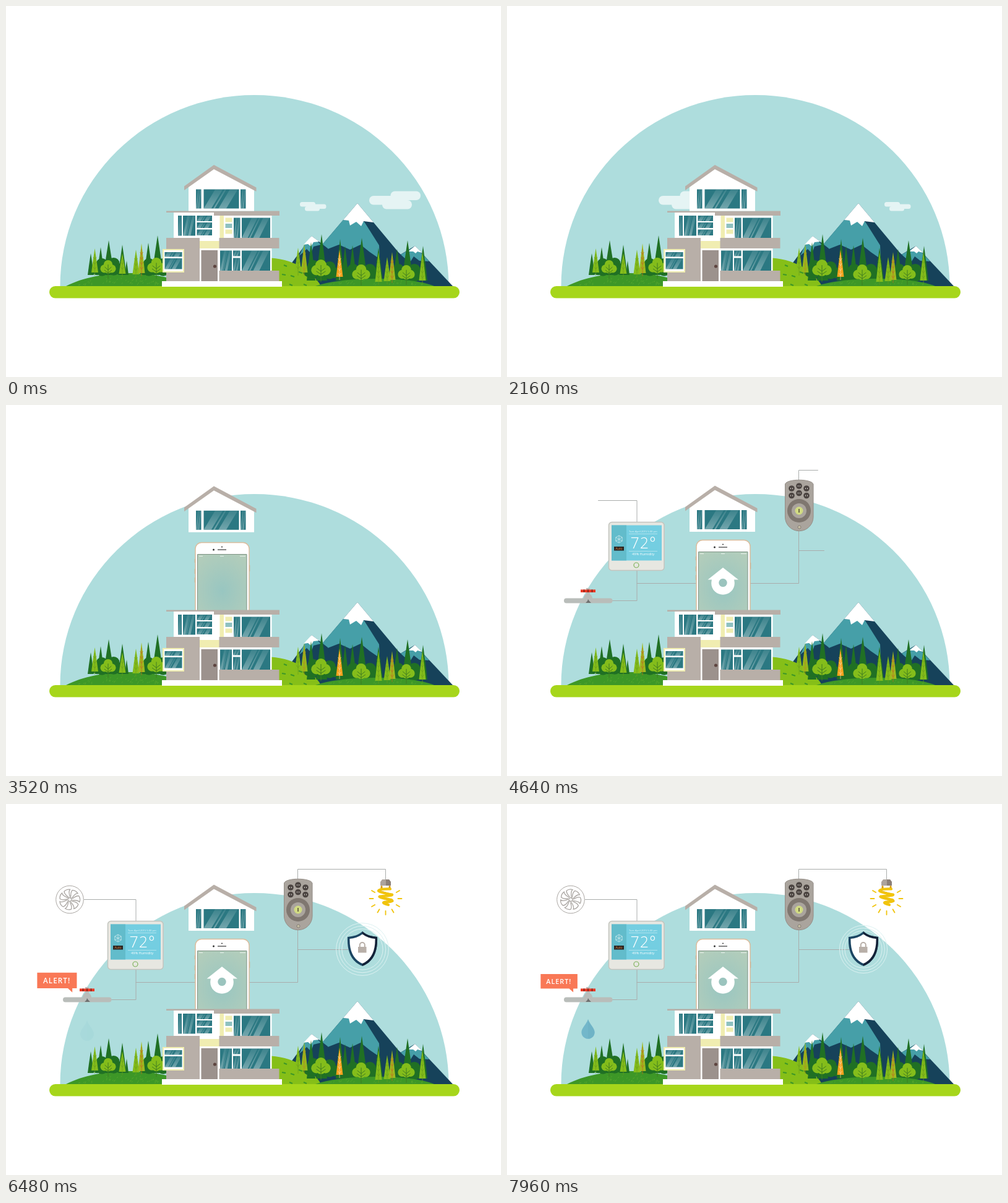
These frames come from a looping animation (800x600 px, 8000 ms). An HTML page:

```html
<!DOCTYPE html>
<html lang="en">
<head>
<meta charset="utf-8">
<title>Smart home</title>
<style>
html, body { margin: 0; width: 100%; height: 100%; overflow: hidden; background: #fff; }
svg { display: block; width: 100vw; height: 100vh; }
text { font-family: "Open Sans", "Noto Sans", sans-serif; fill: #fff; }
.wire { fill: none; stroke: #a9acab; stroke-width: 1; }
.gray { fill: #b8afa8; }
.cream { fill: #f0edb1; }
.white { fill: #fff; }
.navy { fill: #16425a; }
.teal { fill: #469fa8; }
</style>
</head>
<body>
<svg viewBox="0 0 800 600">
  <defs>
    <linearGradient id="shine" x1="0" y1="1" x2="0" y2="0">
      <stop offset="0" stop-color="#fff" stop-opacity=".34"/>
      <stop offset="1" stop-color="#fff" stop-opacity=".08"/>
    </linearGradient>
    <radialGradient id="screen" cx=".5" cy=".62" r=".75">
      <stop offset="0" stop-color="#98c6c1"/><stop offset="1" stop-color="#b4cdba"/>
    </radialGradient>
  </defs>

  <path d="M87.5 453A314 309 0 0 1 715.5 453Z" fill="#aedddd"/>

  <g class="white" opacity=".68">
    <g id="bigCloud">
      <rect x="587" y="307" width="58" height="14.5" rx="7"/>
      <rect x="621.5" y="299.5" width="48.5" height="14.5" rx="7"/>
      <rect x="608" y="314" width="48" height="14.5" rx="7"/>
    </g>
    <g id="smallCloud">
      <rect x="475" y="317" width="25" height="7.5" rx="3.5"/>
      <rect x="487" y="320.5" width="30.5" height="7.5" rx="3.5"/>
      <rect x="483" y="324" width="24" height="7.5" rx="3.5"/>
    </g>
  </g>

  <g id="mountains">
    <path class="navy" d="M661 388L722 453H600L634 404Z"/>
    <path class="teal" d="M661 389L636 403L645 408L652 416L659 405L668 412L684 413Z"/>
    <path class="white" d="M661 388L650 397L658 397L662 400L665 397L672 399Z"/>
    <path class="navy" d="M568 319L594 350L634 398L690 453H454Z"/>
    <path class="teal" d="M545 346L579 349L603 387L604 409L588 398L573 386L556 394L538 386L520 393L505 393Z"/>
    <path class="white" d="M568 319L545 346L554 347L556 355L566 349L574 356L578 348L594 350Z"/>
    <path class="navy" d="M494 372L520 392L540 453H440L460 418Z"/>
    <path class="teal" d="M483 384L503 380L509 386L497 389L493 400L486 393L474 404Z"/>
    <path class="white" d="M494 372L481 386L488 385L493 389L497 382L506 381Z"/>
  </g>

  <path d="M420 407C464 408 495 428 509 453H420Z" fill="#86bf18"/>
  <path d="M97 453C140 430 215 426 262 440V453Z" fill="#3d9727"/>
  <g id="trees"></g>
  <path d="M500 453C545 437 655 437 692 453Z" fill="#3d9727"/>
  <g id="grass" fill="none" stroke-width="1"></g>
  <g id="frontTrees"></g>
  <rect x="70" y="453" width="663" height="19.5" rx="9.75" fill="#a6d61b"/>

  <g class="wire">
    <path id="leftWire" d="M306 288.5H210V154.5H126"/>
    <path id="pipeWire" d="M210 288V316.5H170"/>
    <path id="rightWire" d="M393 288.5H471.5V105.5H613.5V122"/>
    <path id="shieldWire" d="M471.5 235.5H553"/>
  </g>

  <g id="phone">
    <path d="M305.5 245v6m0 10v8m0 6v8m88-28v10" stroke="#c5a888" stroke-width="1.5"/>
    <path d="M306 332.5V228.500A10 10 0 0 1 316 218.500H383A10 10 0 0 1 393 228.500V332.500" fill="#fff" stroke="#dcbd9d" stroke-width="1.5"/>
    <path d="M309.5 332.5V237.500H389V332.500" fill="url(#screen)" stroke="#7f9385"/>
    <circle cx="335.5" cy="230" r="1.5" fill="#333"/><circle cx="349" cy="225.5" r="1" fill="#333"/>
    <path d="M342 230H356" stroke="#444" stroke-width="1.3"/>
    <path d="M312 240.5h6m28 0h6m26 0h9" stroke="#fff" opacity=".7"/>
    <g id="homeIcon" class="white">
      <path d="M349 263L374 282.5H324.5Z"/><circle cx="349" cy="288" r="18.8"/>
      <circle cx="349" cy="287.5" r="6.7" fill="#9bc4be"/>
    </g>
  </g>

  <g id="house">
    <rect class="white" x="271" y="334" width="158.5" height="111"/>
    <rect class="gray" x="259" y="331.5" width="78" height="2.5"/>
    <rect class="gray" x="336" y="331.5" width="106" height="7.5"/>
    <rect class="cream" x="345.5" y="339" width="6.5" height="36"/>
    <path class="cream" d="M354.5 342.5h11v7h-11zm0 19h11v7h-11z"/>
    <rect x="354.5" y="352" width="11" height="7" fill="#8fc1c1"/>
    <rect class="cream" x="313" y="380" width="32" height="12"/>
    <rect class="gray" x="259" y="375" width="54" height="70"/>
    <rect class="gray" x="344.5" y="375" width="97" height="17"/>
    <rect class="gray" x="344.5" y="428" width="97" height="17"/>
    <rect x="315.5" y="395" width="26.5" height="50" fill="#9c928d"/>
    <circle cx="337.5" cy="421" r="2.6" fill="#5e4540"/>
    <rect class="cream" x="253" y="393" width="35" height="38"/>
    <rect class="white" x="255" y="395" width="31" height="34"/>
    <rect class="white" x="252" y="445" width="194" height="9"/>
  </g>
  <g id="roof">
    <path class="white" d="M295 292L336 262L401 297V331.5H295Z"/>
    <path class="gray" d="M288 291.5L336 257L404.5 293.5V300L336 264L288 298Z"/>
  </g>

  <g id="thermostat">
    <rect x="164.5" y="189.5" width="89.5" height="78" rx="5" fill="#e7e7e1" stroke="#c3c4be" stroke-width="1.5"/>
    <rect x="169" y="194.5" width="81" height="57" fill="#74cee1"/>
    <rect x="169" y="194.5" width="24" height="57" fill="#62bccb"/>
    <path d="M197 208.5H243M197 236.5H243" stroke="#fff" stroke-width=".6" opacity=".7"/>
    <path d="M181 211l5.2 3v6l-5.2 3l-5.2-3v-6zM181 211v12m-5.2-9l10.4 6m0-6l-10.4 6" fill="none" stroke="#d8f0f3" stroke-width=".7"/>
    <text x="197" y="206" font-size="4.1" opacity=".85">Tues April 2015 5:00 pm</text>
    <text x="199.5" y="232" font-size="25" font-weight="300" letter-spacing="1">72°</text>
    <text x="202" y="243" font-size="5.6">49% Humidity</text>
    <rect x="173" y="229" width="16" height="6.5" fill="#2b2522"/>
    <text x="175.5" y="234.2" font-size="5" style="fill:#f38a3c">Auto</text>
    <circle cx="209" cy="259" r="4" fill="none" stroke="#7fb35b" stroke-width="1.2"/>
  </g>

  <g id="remote">
    <path d="M449.5 128C452 119 492 119 495 128V181A22.7 22.7 0 0 1 449.5 181Z" fill="#aaa49d" stroke="#938c85"/>
    <circle cx="472" cy="171" r="19" fill="#7f7770"/><circle cx="472" cy="171" r="12" fill="#aaa49d"/>
    <circle cx="472" cy="171" r="6.5" fill="#d1db83"/>
    <path d="M472 168v6" stroke="#504a35" stroke-width="1.5"/>
    <circle cx="472.5" cy="197.5" r="2.3" fill="#f1eec9" stroke="#756e67"/><circle cx="472.5" cy="197.5" r=".8" fill="#655"/>
  </g>

  <g id="drop">
    <path d="M0-33C3-24 11-18 11-11A11 11 0 0 1-11-11C-11-18-3-24 0-33" fill="#479bbd"/>
    <path d="M0-33C3-24 11-18 11-11A11 11 0 0 1 0 0Z" fill="#3889ad" opacity=".4"/>
  </g>
  <g id="pipe">
    <path d="M128 296h6v10q4 2 4 7h-14q0-5 4-7z" fill="#b9bcb9"/>
    <rect x="92" y="312.5" width="78.5" height="8" rx="4" fill="#b9bdba"/>
    <rect x="119" y="298.5" width="24" height="4.5" fill="#ea3b27"/>
    <path d="M124.5 298.5v4.5m6.5-4.5v4.5m6.5-4.5v4.5" stroke="#6d2721" stroke-width="1.5"/>
    <path d="M131 314l2 3l3 3h-9l3-3z" fill="#6d706f"/>
  </g>

  <g id="fan" fill="#fff" stroke="#aaa6a2">
    <circle cx="103" cy="154.5" r="22.3"/>
    <g id="blades" fill="none" stroke-width="1.3"></g>
  </g>

  <g id="rings" fill="none" stroke="#dcf1f1"></g>
  <g id="shield">
    <path d="M576 206C582 212 591 214 600 215C601 239 594 255 576 262C558 255 551 239 552 215C561 214 570 212 576 206Z" fill="#1b4562"/>
    <path d="M576 206C582 212 591 214 600 215C601 239 594 255 576 262Z" fill="#142238"/>
    <path class="white" d="M576 210.5C582 215 589 217.5 596.5 218C597 238 590 252 576 258C562 252 555 238 555.5 218C563 217.5 570 215 576 210.5Z"/>
    <rect class="gray" x="569" y="231" width="13.5" height="9.5"/>
    <path d="M571.8 231v-3a4 4 0 0 1 8 0v3" fill="none" stroke="#b8afa8" stroke-width="2"/>
  </g>

  <g id="bulb" fill="none" stroke="#f1c40c" stroke-linecap="round">
    <path d="M605 132v-6l3-4h11l3 4v6z" fill="#aca39c" stroke="none"/>
    <path d="M614 122h5l3 4v6h-8z" fill="#8b8078" stroke="none"/>
    <path d="M607 133.500v4M620 133.500v4M603 141L624 147M603 150L625 157" stroke="#d99a12" stroke-width="3"/>
    <path d="M621 137.5Q602 137 602 140.500Q603 143 624 146.500Q626 148 604 149.500Q602 151 623 155Q628 158 612 158.500Q606 160 618 163" stroke-width="4.2"/>
    <g id="rays" stroke-width="1.8"></g>
  </g>

  <g id="alert">
    <path d="M60 278H113V299H107V304.5L101 299H60Z" fill="#f97856"/>
    <text x="68" y="292" font-size="9.6" font-weight="600" letter-spacing=".9">ALERT!</text>
  </g>
</svg>

<script>
const $ = id => document.getElementById(id);
const add = (id, markup) => $(id).insertAdjacentHTML('beforeend', markup);
const DARK = '#207024', LIGHT = '#84bd1b', ORANGE = '#f5a21d';

const spike = (x, top, base, w, color) => {
  const mid = (top + base) / 2, h = w / 2;
  return `<path d="M${x} ${top}Q${x + h * .55} ${mid} ${x + h} ${base}H${x - h}Q${x - h * .55} ${mid} ${x} ${top}" fill="${color}"/>`;
};
const leafTree = (x, top, base, color = LIGHT, vein = '#6a9c1c') => {
  let veins = `M${x} ${top + 9}V${base + 5}`;
  for (let y = top + 14; y < base - 3; y += 8) veins += `M${x - 2.5} ${y}l2.5 4l2.5-4`;
  return spike(x, top, base, 11, color) + `<path d="${veins}" fill="none" stroke="${vein}" stroke-width=".7"/>`;
};
const bush = (x, y, r, color) =>
  [[0, -.4, .6], [-.5, .15, .55], [.5, .15, .55], [0, .2, .6]].map(([dx, dy, k]) =>
    `<circle cx="${x + dx * r}" cy="${y + dy * r}" r="${k * r}" fill="${color}"/>`).join('');
const roundTree = (x, y, r) => bush(x, y, r, LIGHT) +
  `<path d="M${x} ${y - r * .4}V${y + r + 6}M${x - r * .45} ${y - 1}l${r * .45} 5l${r * .45}-5M${x - r * .5} ${y + 4}l${r * .5} 5l${r * .5}-5" fill="none" stroke="#3f7c20"/>`;

const pines = [
  [137, 400, 10], [153, 390, 12], [166, 379, 17], [188, 386, 13], [195, 412, 6], [230, 383, 14], [245, 371, 18],
  [493, 382, 14], [510, 369, 18], [540, 377, 14], [548, 388, 12], [560, 387, 13], [575, 375, 18],
  [602, 391, 14], [632, 393, 13], [649, 379, 18], [674, 388, 14]];
add('trees', pines.map(([x, top, w]) => spike(x, top, x < 300 ? 435 : 444, w, DARK)).join('') +
  [[155, 424], [174, 423], [231, 424], [254, 424], [497, 427], [523, 429], [561, 433], [588, 433], [634, 433], [660, 433]]
    .map(([x, y]) => bush(x, y, 16, DARK)).join('') +
  leafTree(143.5, 392, 431) + leafTree(188, 400, 433) + leafTree(210, 394, 434) +
  leafTree(219, 384, 432, '#9fb91e', '#bf6a22') + leafTree(472, 391, 431) + leafTree(482, 385, 431, '#94b91c', '#b78f20'));
add('frontTrees', roundTree(165, 423, 12) + roundTree(243, 421, 14) + roundTree(509, 425, 15) +
  roundTree(574, 432, 14) + roundTree(647, 432, 13) + leafTree(539, 394, 438, ORANGE, '#fbd9a0') +
  leafTree(602, 398, 446) + leafTree(616, 406, 445) + leafTree(624, 398, 443, '#9fb91e', '#bf6a22') + leafTree(673, 398, 444));

let seed = 7;
const random = () => (seed = seed * 16807 % 2147483647) / 2147483647;
let tufts = '';
for (let i = 0; i < 90; i++) {
  const left = i < 55, u = random() * 2 - 1;
  const x = left ? 185 + u * 68 : 597 + u * 76;
  const y = 452 - random() * (1 - u * u) * (left ? 15 : 9);
  tufts += `M${x.toFixed(1)} ${y.toFixed(1)}l1.5-2`;
}
add('grass', `<path d="${tufts}" stroke="#64ae31" opacity=".6"/>
  <path d="M449 419l5 2m-8 13l6 1m8 1l6 2m7-8l6 2m-21 18l5 2m18-2l5 2" stroke="#3d9727" stroke-width="2"/>`);

// Glass with slanted reflections that fade upward
const pane = ([x, y, w, h]) => {
  const slant = Math.min(w * .35, h * .6), room = w - slant;
  const band = (from, to) => `M${x + room * from} ${y + h}L${x + slant + room * from} ${y}H${x + slant + room * to}L${x + room * to} ${y + h}Z`;
  return `<rect x="${x}" y="${y}" width="${w}" height="${h}" fill="#2b7882"/>
    <path d="${band(0, .32)}${band(.4, .47)}${band(.62, .95)}" fill="url(#shine)"/>`;
};
const panes = list => list.map(pane).join('');
add('roof', panes([[307, 296.5, 8.5, 31], [319.5, 296.5, 57, 31], [379, 296.5, 8.5, 31]]));
add('house', panes([
  [278, 339, 6, 32.5], [286, 339, 20, 32.5], [308.5, 339, 24.5, 9], [308.5, 350, 24.5, 9], [308.5, 361.5, 24.5, 9.5],
  [368, 342.5, 10.5, 32.5], [381, 342.5, 46, 32.5], [346, 395.5, 19, 32.5], [367, 395.5, 11.5, 9], [367, 407.5, 11.5, 20.5],
  [381, 395.5, 46, 32.5], [256.5, 398, 28, 7.5], [256.5, 408, 28, 17.5]]));

add('remote', [[460, 135], [472, 131], [484, 135], [460, 146.5], [472, 142.5], [484, 146.5]].map(([x, y]) =>
  `<circle cx="${x}" cy="${y}" r="4.8" fill="#4b4441"/><path d="M${x - 1.5} ${y - 1}v2m3-2v2" stroke="#d5d0cb"/>`).join(''));

for (let i = 0; i < 7; i++)
  add('blades', `<path transform="rotate(${i * 360 / 7})" d="M-1-4C-3-8-6-10-5-15Q0-18 5-15.5C1-13 2-8 1.5-4"/>`);
add('blades', '<circle r="3"/>');
[1, .89, .78].forEach(k => add('rings', `<circle r="${45 * k}" vector-effect="non-scaling-stroke"/>`));
for (let a = -30; a <= 210; a += 30)
  add('rays', `<path transform="translate(613.5 153) rotate(${a})" d="M20 0H26"/>`);

const clamp = v => Math.min(1, Math.max(0, v));
const span = (t, start, length) => clamp((t - start) / length);
const expoOut = p => p >= 1 ? 1 : 1 - 2 ** (-10 * p);
const backOut = p => p <= 0 ? 0 : 1 + 2.70158 * (p - 1) ** 3 + 1.70158 * (p - 1) ** 2;
const wave = (t, peak, period) => Math.cos(2 * Math.PI * (t - peak) / period);
const show = (id, visible) => $(id).style.display = visible ? '' : 'none';
const transform = (id, value) => $(id).setAttribute('transform', value);
const scaleAt = (id, x, y, s) => {
  show(id, s > 0);
  transform(id, `translate(${x} ${y}) scale(${s}) translate(${-x} ${-y})`);
};

// id, centre x, centre y, start, duration
const pops = [
  ['homeIcon', 349, 285, 3640, 360], ['thermostat', 209, 228, 4190, 300], ['pipe', 131, 316, 4310, 300],
  ['remote', 472, 162, 4372, 260], ['fan', 103, 154.5, 4691, 300], ['shield', 576, 234, 4727, 300], ['bulb', 613.5, 150, 4865, 350]];
// id, start, px per ms
const wires = [['leftWire', 3889, .39], ['pipeWire', 4135, .39], ['rightWire', 4040, .488], ['shieldWire', 4552, .47]]
  .map(([id, start, speed]) => ({ id, start, speed, length: $(id).getTotalLength() }));

function draw(t) {
  show('bigCloud', t < 3040);
  show('smallCloud', t < 3040);
  transform('bigCloud', `translate(${-.1583 * t})`);
  transform('smallCloud', `translate(${.0625 * t})`);

  transform('roof', `translate(0 ${-126.5 * expoOut(span(t, 3200, 440))})`);
  transform('phone', `translate(0 ${120 * (1 - expoOut(span(t, 3280, 490)))})`);

  for (const { id, start, speed, length } of wires) {
    const shown = Math.min(length, Math.max(0, (t - start) * speed));
    show(id, shown > 0);
    $(id).setAttribute('stroke-dasharray', `${shown} ${length + 5}`);
  }
  for (const [id, x, y, start, length] of pops) scaleAt(id, x, y, backOut(span(t, start, length)));

  transform('blades', `translate(103 154.5) rotate(${t * .18})`);

  const ring = (44 + 7 * wave(t, 6095, 1340)) / 45 * expoOut(span(t, 4900, 300));
  show('rings', ring > 0);
  transform('rings', `translate(576 235) scale(${ring})`);

  scaleAt('alert', 106, 303.5, (1.12 + .12 * wave(t, 6680, 1700)) * expoOut(span(t, 4900, 200)));

  const age = (t - 4680) % 1000, fall = clamp(age / 290);
  show('drop', t >= 4680);
  transform('drop', `translate(131 ${322 + 61 * fall ** 1.5}) scale(${.05 + .95 * fall})`);
  $('drop').setAttribute('opacity', fall < 1 ? 1 - .45 * fall : .55 * clamp(1 - (age - 290) / 560));
}

let origin;
function tick(now) {
  origin ??= now;
  draw((now - origin) % 8000);
  requestAnimationFrame(tick);
}
draw(0);
requestAnimationFrame(tick);
</script>
</body>
</html>
```
